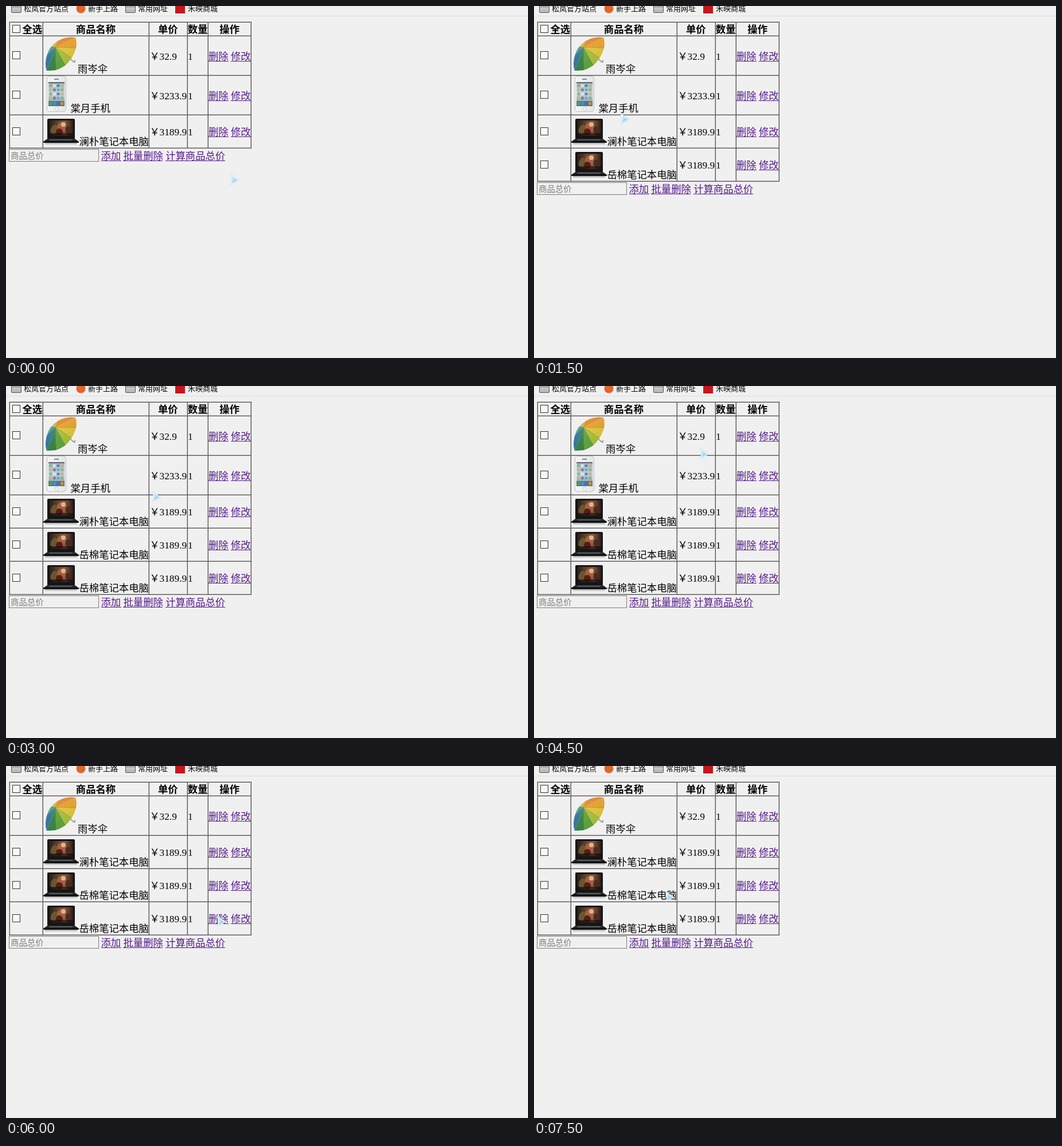
Animation, 910 px wide and 615 px high, one loop 8 s. Source, as an HTML page with a canvas:

```html
<!DOCTYPE html>
<html lang="zh">
<head>
<meta charset="utf-8">
<style>
  html, body { margin: 0; width: 100%; height: 100%; overflow: hidden; background: #f0f0f0; }
  canvas { display: block; width: 910px; height: 615px; }
</style>
</head>
<body>
<canvas id="stage" width="910" height="615"></canvas>
<script>
const ctx = document.getElementById('stage').getContext('2d');
const STEP = 500, LOOP = 8000;
const EM = 17.333;
const CJK = '"Noto Sans CJK SC", "Noto Sans CJK", sans-serif';
const SERIF = '"Liberation Serif", "Noto Sans CJK SC", serif';
const PURPLE = '#551a8b', DARK = '#555', LIGHT = '#b4b4b4', BG = '#f0f0f0';
const COLS = [6, 64, 249, 316, 352, 427];

const ITEMS = {
  u: { name: '雨岑伞', price: '32.9', h: 69, x: 125, pic: umbrella },
  p: { name: '棠月手机', price: '3233.9', h: 69, x: 112.5, pic: phone },
  l: { name: '澜朴笔记本电脑', price: '3189.9', h: 58, x: 127.5, pic: laptop },
  a: { name: '岳棉笔记本电脑', price: '3189.9', h: 58, x: 127.5, pic: laptop }
};

// [first step, rows shown from then on]
const LISTS = [[0, 'upl'], [3, 'upla'], [6, 'uplaa'], [10, 'ulaa'], [13, 'ula'], [15, 'ulaa']];

// pointer position, one per step
const POINTER = [
  [391, 294], [82, 147], [174, 183], [151, 188], [144, 248], [140, 256],
  [255, 184], [370, 153], [286, 119], [289, 109], [297, 176], [291, 180],
  [368, 262], [224, 210], [200, 208], [229, 219]
];

function rect(x, y, w, h, color) {
  ctx.fillStyle = color;
  ctx.fillRect(x, y, w, h);
}

function frame(x, y, w, h, line, fill) {
  rect(x, y, w, h, line);
  rect(x + 1, y + 1, w - 2, h - 2, fill);
}

function shape(points, color) {
  ctx.beginPath();
  points.forEach(p => ctx.lineTo(p[0], p[1]));
  ctx.closePath();
  ctx.fillStyle = color;
  ctx.fill();
}

function round(x, y, w, h, r, color) {
  ctx.beginPath();
  ctx.roundRect(x, y, w, h, r);
  ctx.fillStyle = color;
  ctx.fill();
}

function oval(x, y, rx, ry, color, turn = 0) {
  ctx.beginPath();
  ctx.ellipse(x, y, rx, ry, turn, 0, Math.PI * 2);
  ctx.fillStyle = color;
  ctx.fill();
}

function fade(x0, y0, x1, y1, ...colors) {
  const g = ctx.createLinearGradient(x0, y0, x1, y1);
  colors.forEach((c, i) => g.addColorStop(i / (colors.length - 1), c));
  return g;
}

function text(str, x, y, size = EM, color = '#000', font = CJK, weight = 400) {
  ctx.font = `${weight} ${size}px ${font}`;
  ctx.fillStyle = color;
  ctx.fillText(str, x, y);
}

function links(words, x, y) {
  for (const word of words) {
    const w = word.length * EM;
    text(word, x, y, EM, PURPLE);
    rect(Math.round(x), y + 2, Math.round(w), 1, PURPLE);
    x += w + EM / 4;
  }
}

function cell(x, y, w, h) {
  rect(x, y, w, h, LIGHT);
  rect(x, y, w, 1, DARK);
  rect(x, y, 1, h, DARK);
  rect(x + 1, y + 1, w - 2, h - 2, BG);
}

function cells(y, h) {
  for (let i = 0; i < 5; i++) cell(COLS[i], y, COLS[i + 1] - COLS[i], h);
}

function checkbox(y) {
  frame(11, y, 14, 14, '#333', '#f8f8f8');
}

function umbrella(y) {
  ctx.save();
  ctx.translate(64, y);
  ctx.lineCap = 'round';
  ctx.lineWidth = 1.6;
  ctx.strokeStyle = '#8a8a80';
  ctx.beginPath();
  ctx.moveTo(30, 24);
  ctx.lineTo(53, 45);
  ctx.quadraticCurveTo(57, 48, 56, 43);
  ctx.stroke();
  ctx.beginPath();
  ctx.moveTo(57, 3);
  ctx.bezierCurveTo(38, 0, 20, 9, 11, 25);
  ctx.bezierCurveTo(4, 39, 4, 53, 7, 61);
  ctx.quadraticCurveTo(16, 61, 23, 60);
  ctx.quadraticCurveTo(32, 57, 39, 52);
  ctx.quadraticCurveTo(46, 46, 50, 39);
  ctx.quadraticCurveTo(56, 30, 58, 21);
  ctx.quadraticCurveTo(60, 12, 57, 3);
  ctx.clip();
  const rim = [[66, -2], [60, 21], [52, 40], [40, 53], [23, 63], [5, 65], [-2, 42], [8, 16], [28, 0]];
  const tint = ['#eda52a', '#e8cb3a', '#adc93a', '#62a93c', '#34864a', '#2e74a0', '#4a9a78', '#c4bd3c', '#e58a2e'];
  rim.forEach((p, i) => shape([[22, 20], p, rim[(i + 1) % rim.length]], tint[i]));
  ctx.lineWidth = 0.7;
  ctx.strokeStyle = 'rgba(40,80,40,.45)';
  rim.slice(1, 5).forEach(p => {
    ctx.beginPath();
    ctx.moveTo(22, 20);
    ctx.lineTo(p[0], p[1]);
    ctx.stroke();
  });
  rect(0, 0, 66, 66, fade(10, 5, 50, 60, 'rgba(255,255,255,.12)', 'rgba(0,0,0,.1)'));
  ctx.restore();
}

function phone(y) {
  ctx.save();
  ctx.translate(64, y);
  round(7, 1, 34, 63, 5, '#bcbfc2');
  round(8, 2, 32, 61, 4, fade(8, 0, 40, 0, '#f5f5f6', '#e5e6e8'));
  rect(20, 6, 8, 1.5, '#666');
  rect(10, 12, 28, 42, fade(0, 12, 0, 54, '#a9b6c0', '#c3d0d8', '#8298a9'));
  rect(10, 12, 28, 2, '#59636c');
  const tint = ['#82b38a', '#dfe6eb', '#4f86b8', '#c8b27c', '#71818f', '#6ba8cf'];
  for (let r = 0; r < 4; r++)
    for (let c = 0; c < 4; c++)
      round(11.5 + c * 6.6, 16 + r * 7.2, 4.6, 4.6, 1, tint[(r * 3 + c) % 6]);
  rect(10, 45, 28, 9, '#5b7488');
  ['#49a350', '#4092d5', '#3178bd', '#dd8a3c'].forEach((c, i) => round(11.5 + i * 6.6, 46.5, 5, 5.5, 1, c));
  oval(24, 58.5, 3.3, 3.3, '#c5c8cb');
  oval(24, 58.5, 2.5, 2.5, '#f1f1f2');
  ctx.restore();
}

function laptop(y) {
  ctx.save();
  ctx.translate(64, y);
  round(8, 7, 48, 36, 2, '#141517');
  rect(11, 10, 42, 27, fade(11, 0, 53, 0, '#241c17', '#5f4029', '#8a5539', '#2b1e1a'));
  oval(20, 26, 6, 9, '#6d5530', 0.3);
  oval(33, 22, 8, 9, '#a3603f', -0.2);
  oval(36, 17, 4, 4, '#dfb58c');
  oval(29, 30, 6, 6, '#541d17', 0.4);
  oval(45, 28, 5, 8, '#4a2a24', -0.3);
  rect(11, 32, 42, 5, 'rgba(15,10,9,.6)');
  shape([[8, 42], [56, 42], [63, 47], [1, 47]], fade(0, 42, 0, 47, '#35373b', '#141414'));
  shape([[13, 43], [51, 43], [53, 45], [11, 45]], '#55585c');
  round(1, 46.5, 62, 2.5, 1, '#111');
  rect(4, 49, 56, 4, fade(0, 49, 0, 53, '#a4a4a4', BG));
  ctx.restore();
}

function folder(x) {
  round(x, -5, 18, 17, 2, '#555');
  round(x + 1, -4, 16, 15, 1, fade(0, -2, 0, 11, '#d2d2d2', '#b5b5b5'));
  rect(x + 1, 1, 16, 1, '#777');
}

function toolbar() {
  folder(9);
  text('松岚官方站点', 31, 9, 13);
  oval(130.5, 4.5, 8, 8, '#e0662a');
  text('新手上路', 143, 9, 13);
  folder(208);
  text('常用网址', 230, 9, 13);
  rect(295, -4, 17, 17, '#c5161d');
  text('禾映商城', 317, 9, 13);
  rect(0, 17, 910, 1, '#dedede');
}

function header() {
  cells(28, 24);
  checkbox(33);
  const titles = [['全选', 28.5], ['商品名称', 121.8], ['单价', 265], ['数量', 316.8], ['操作', 372.3]];
  titles.forEach(([s, x]) => text(s, x, 47, EM, '#000', CJK, 700));
}

function row(item, y) {
  const mid = y + item.h / 2, base = Math.round(mid + 7);
  cells(y, item.h);
  checkbox(Math.floor(mid - 7));
  item.pic(y);
  text(item.name, item.x, y + item.h - 5);
  text('￥', 250.5, base, EM, '#000', CJK, 500);
  text(item.price, 267.5, base, EM, '#000', SERIF);
  text('1', 317, base, EM, '#000', SERIF);
  links(['删除', '修改'], 353, base);
}

function footer(y) {
  frame(5, y + 1, 157, 22, '#7c7c7c', BG);
  text('商品总价', 8, y + 18, 14.444, '#7c7c7c');
  links(['添加', '批量删除', '计算商品总价'], 165.5, y + 19);
}

function pointer(x, y) {
  ctx.save();
  ctx.translate(x, y);
  ctx.beginPath();
  [[1, 1], [13.5, 10.5], [1.5, 17], [3.5, 10]].forEach(p => ctx.lineTo(p[0], p[1]));
  ctx.closePath();
  ctx.lineJoin = 'round';
  ctx.lineWidth = 2.4;
  ctx.strokeStyle = '#a9d4f0';
  ctx.stroke();
  ctx.fillStyle = fade(0, 2, 10, 17, '#d8effd', '#b5ddf8', '#86c2ec');
  ctx.fill();
  ctx.lineWidth = 1.3;
  ctx.strokeStyle = '#eef8ff';
  ctx.stroke();
  ctx.restore();
}

function draw(time) {
  const step = Math.floor((time % LOOP) / STEP);
  const list = LISTS.filter(l => l[0] <= step).pop()[1];
  rect(0, 0, 910, 615, BG);
  toolbar();

  const end = [...list].reduce((y, k) => y + ITEMS[k].h, 52);
  rect(5, 27, 423, end - 26, DARK);
  rect(5, 27, 422, 1, LIGHT);
  rect(5, 27, 1, end - 27, LIGHT);
  header();
  let y = 52;
  for (const k of list) {
    row(ITEMS[k], y);
    y += ITEMS[k].h;
  }
  footer(end + 1);
  pointer(...POINTER[step]);
}

const start = performance.now();
function tick() {
  draw(performance.now() - start);
  requestAnimationFrame(tick);
}
tick();
</script>
</body>
</html>
```
